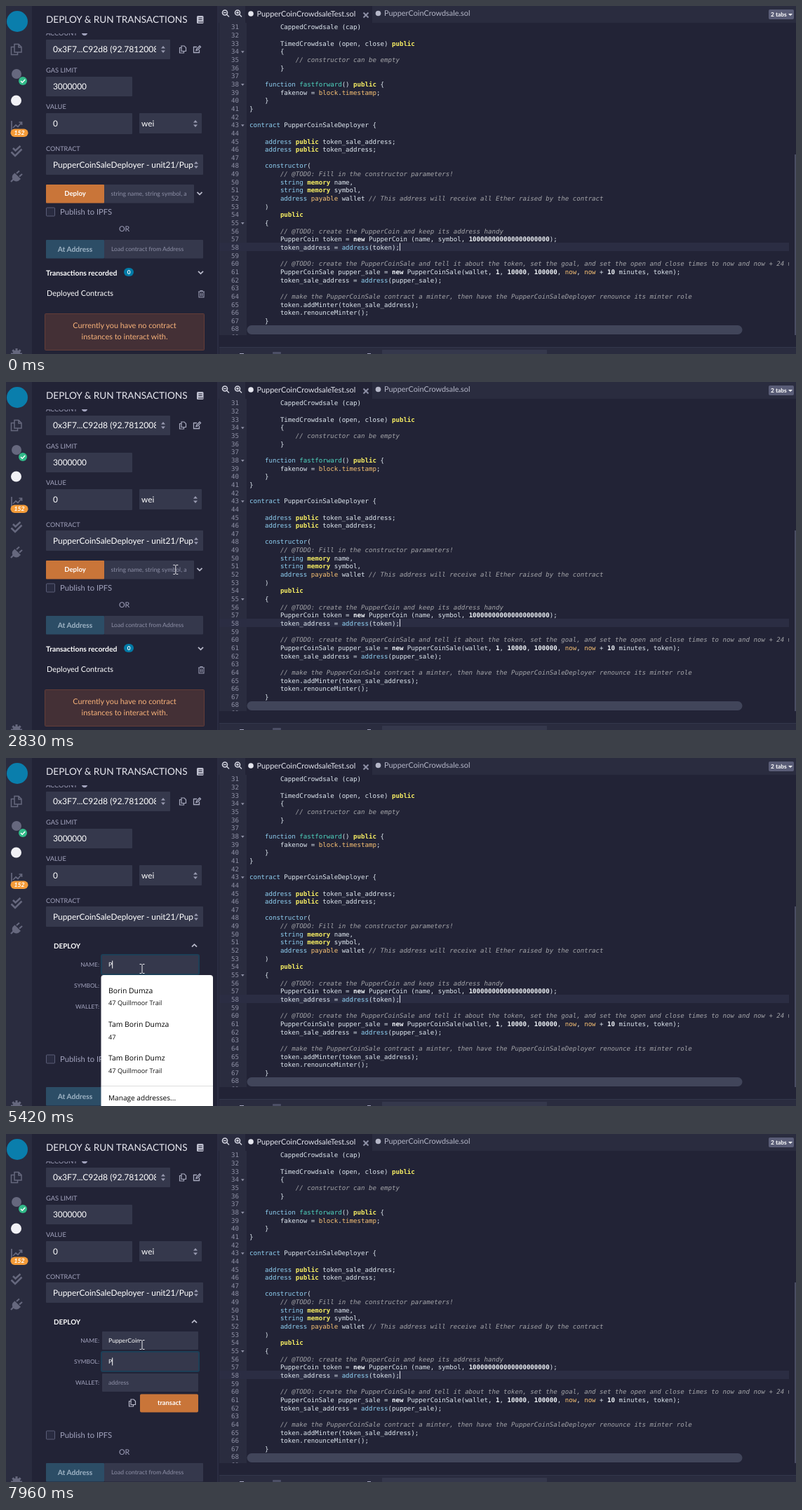
An HTML page for the animation above (8000 ms loop, 1126 by 497 pixels).

```html
<!DOCTYPE html>
<html lang="en">
<head>
<meta charset="utf-8">
<title>Deploy and run</title>
<style>
html, body { margin: 0; width: 100%; height: 100%; overflow: hidden; background: #222336; }
svg { display: block; font-family: Lato, "Open Sans", sans-serif; text-rendering: geometricPrecision; }
.mono { font-family: "DejaVu Sans Mono", monospace; }
.popup { font-family: "Open Sans", "Noto Sans", sans-serif; }
</style>
</head>
<body>
<svg id="stage" width="1126" height="497" viewBox="0 0 1126 497"></svg>
<script>
const LIGHT = '#2a2c3f', FIELD = '#35384c', BODY = '#222336', MUTED = '#a2a3bd', ORANGE = '#c97539', ICON = '#66687e';

const rect = (x, y, w, h, fill, r = 0, more = '') =>
  `<rect x="${x}" y="${y}" width="${w}" height="${h}" fill="${fill}" rx="${r}" ${more}/>`;
const text = (x, y, s, size = 11.8, fill = '#fff', more = '') =>
  `<text x="${x}" y="${y}" font-size="${size}" fill="${fill}" ${more}>${s}</text>`;
const line = (d, stroke, width = 1.3) =>
  `<path d="${d}" fill="none" stroke="${stroke}" stroke-width="${width}"/>`;
const shape = (d, fill) => `<path d="${d}" fill="${fill}"/>`;
const dot = (x, y, r, fill) => `<circle cx="${x}" cy="${y}" r="${r}" fill="${fill}"/>`;
const group = (id, content, more = '') => `<g id="${id}" ${more}>${content}</g>`;
const bold = 'font-weight="700"', mid = 'text-anchor="middle"', end = 'text-anchor="end"';

const chevron = (x, y, dir = 1) => line(`M${x - 3.5} ${y - 1.7 * dir}l3.5 ${3.5 * dir}l3.5 ${-3.5 * dir}`, '#b9bacb', 1.8);
const updown = (x, y) => shape(`M${x - 3} ${y - 1.5}l3 -3.5l3 3.5zM${x - 3} ${y + 1.5}l3 3.5l3 -3.5z`, '#9a9cb2');
const copyIcon = (x, y, c) => line(`M${x - 2} ${y - 5}h4l2.5 2.5v5h-6.5zM${x - 2} ${y - 2.5}h-2.5v7.5h6v-2.5`, c, 1.2);

const code = `        CappedCrowdsale (cap)

        TimedCrowdsale (open, close) public
        {
            // constructor can be empty
        }

    function fastforward() public {
        fakenow = block.timestamp;
    }
}

contract PupperCoinSaleDeployer {

    address public token_sale_address;
    address public token_address;

    constructor(
        // @TODO: Fill in the constructor parameters!
        string memory name,
        string memory symbol,
        address payable wallet // This address will receive all Ether raised by the contract
    )
        public
    {
        // @TODO: create the PupperCoin and keep its address handy
        PupperCoin token = new PupperCoin (name, symbol, 100000000000000000000);
        token_address = address(token);

        // @TODO: create the PupperCoinSale and tell it about the token, set the goal, and set the open and close times to now and now + 24 weeks.
        PupperCoinSale pupper_sale = new PupperCoinSale(wallet, 1, 10000, 100000, now, now + 10 minutes, token);
        token_sale_address = address(pupper_sale);

        // make the PupperCoinSale contract a minter, then have the PupperCoinSaleDeployer renounce its minter role
        token.addMinter(token_sale_address);
        token.renounceMinter();
    }

`.split('\n');

const styles = {
  comment: 'fill="#a3a4a8" font-style="italic"',
  access: 'fill="#f8ef63" font-weight="700"',
  type: 'fill="#8fd0f2"',
  special: 'fill="#f9c274"',
  name: 'fill="#4fd6c0"',
  strong: 'fill="#f2f6fa" font-weight="700"',
};
const tokens = /(?<comment>\/\/.*)|\b(?:(?<access>public|memory)|(?<type>contract|function|constructor|address|string)|(?<special>payable|block|timestamp|now)|(?<name>fastforward)|(?<strong>new|\d+))\b/g;
const paint = s => s.replace(tokens, (m, ...rest) => {
  const kinds = rest.at(-1);
  return `<tspan ${styles[Object.keys(kinds).find(k => kinds[k])]}>${m}</tspan>`;
});

function editor() {
  let out = rect(301, 0, 2, 497, '#2b2d42') + rect(303, 0, 823, 24, LIGHT) + rect(341, 0, 181, 24, BODY)
    + rect(304, 24, 39, 446, LIGHT) + rect(304, 338, 812, 12, '#2b2d43');
  for (const x of [312, 330])
    out += `<circle cx="${x}" cy="9.5" r="3.5" fill="none" stroke="#d5d6e2" stroke-width="1.6"/>`
      + line(`M${x + 2.5} 12l3.5 3.5M${x - 1.8} 9.5h3.6${x > 320 ? `M${x} 7.7v3.6` : ''}`, '#d5d6e2', 1.4);
  out += dot(349, 11, 3.8, '#e4e5ee') + text(357.5, 15, 'PupperCoinCrowdsaleTest.sol', 10.9, '#e4e5ee')
    + line('M509.5 9.5l7 7m0-7l-7 7', '#8d8fa5', 2)
    + dot(530.5, 10.5, 3.8, '#b5b7c8') + text(539, 14.3, 'PupperCoinCrowdsale.sol', 10.9, '#b5b7c8')
    + rect(1087, 5, 36, 14, '#595c76', 2) + text(1090, 15.2, '2 tabs', 8.4, '#fff', bold)
    + shape('M1115 11h6l-3 3z', '#fff');
  let rows = '';
  code.forEach((row, i) => {
    const n = 31 + i, y = 33.4 + i * 11.65, pad = row.search(/\S|$/);
    rows += text(332, y, n, 9.115, '#8f91a6', end);
    if (row) rows += text(347 + pad * 5.487, y, paint(row.trim()), 9.115, '#dfe8f0');
    if ([34, 38, 43, 55].includes(n)) rows += shape(`M335 ${y - 4}h4.6l-2.3 3z`, '#8f91a6');
  });
  return out + '<clipPath id="codeArea"><path d="M304 24h812v446h-812z"/></clipPath>'
    + `<g class="mono" clip-path="url(#codeArea)">${rows}</g>`
    + rect(561, 338.5, 1, 11, '#e6e7ef')
    + rect(343.5, 456, 706, 13, '#41455a', 6.5, 'id="scroll"')
    + rect(1124, 212, 2, 258, '#4a4d63')
    + rect(304, 487, 822, 1, '#34374c') + rect(304, 488, 822, 9, LIGHT)
    + rect(536, 491, 235, 6, FIELD, 1) + rect(380, 494, 12, 3, '#4c4f66', 1)
    + rect(333, 496, 6, 1, MUTED) + rect(515, 496, 5, 1, MUTED);
}

function sidebar() {
  const teeth = [...Array(8)].map((_, i) => `<path d="M-1.5 -8h3v4h-3z" transform="rotate(${i * 45})"/>`).join('');
  return rect(0, 0, 37, 497, LIGHT) + dot(16, 22, 15, '#0a7eac')
    + line('M12 54.5h6l4 4v7.5h-10zM12 58.5h-4.5v11h9v-3.5M18 55v4h4', ICON, 1.5)
    + dot(15, 97, 7, ICON) + dot(24, 107, 6, '#32ba89') + line('M21 107l2.2 2.2l4-4.2', '#fff', 1.5)
    + dot(14.5, 135, 7.5, '#f1f1f6')
    + line('M8 164v14h15M10 174l4-4l3 2.5l5-6M18.5 166h4v4', ICON, 1.7)
    + rect(6.5, 175.5, 25, 11.5, '#f49b38', 5.7)
    + text(19, 184.4, '152', 8.6, '#fff', `${bold} font-style="italic" ${mid}`)
    + line('M10 203l3.5 3.5l7-6.5M7.5 208.5l5.5 5.5l9.5-9.5', ICON, 2.5)
    + line('M7 251l4-4M15 239l4-3.5M19 243.5l4-3.5', ICON, 2.2)
    + shape('M12.5 238.5l8.5 8.5q-5 5.5-9.5 2.5l-2-2q-2.5-5 3-9z', ICON)
    + `<g transform="translate(15 497)" fill="${ICON}">${teeth}<circle r="5.5"/></g>`;
}

function panel() {
  const fixed = text(57, 24, 'DEPLOY &amp; RUN TRANSACTIONS', 13.6, '#e8e8f0')
    + rect(272, 14, 9.5, 11, '#c0c1d0', 1.5) + line('M274.5 17h5M274.5 19.5h5M274 23h7', BODY, 1)
    + '<clipPath id="cut"><path d="M50 39h245v8h-245z"/></clipPath><g clip-path="url(#cut)">'
    + text(57, 41.7, 'ACCOUNT', 9.2, MUTED) + dot(112, 38, 4.2, MUTED) + '</g>'
    + '<clipPath id="account"><path d="M57 48h157v28h-157z"/></clipPath>'
    + rect(57, 48, 177, 28, FIELD, 1) + text(67, 66.3, '0x3F7...C92d8 (92.7812008', 12.1, '#fff', 'clip-path="url(#account)"')
    + updown(224, 62) + copyIcon(252, 62, '#a9abc0')
    + line('M272 58.5h-4.5v8h8v-4M271 63.5l.5-2l4.5-4.5l1.5 1.5l-4.5 4.5z', '#a9abc0')
    + text(57, 94.5, 'GAS LIMIT', 9.3, MUTED) + rect(57, 101, 123, 28, FIELD, 1) + text(67, 119.2, '3000000')
    + text(57, 146.5, 'VALUE', 9.3, MUTED) + rect(57, 153, 123, 30, FIELD, 1) + text(67, 172.2, '0')
    + rect(190, 153, 89, 29, FIELD, 1) + text(193, 172.2, 'wei') + updown(270, 168)
    + text(57, 206.5, 'CONTRACT', 9.1, MUTED) + rect(57, 212, 224, 29, FIELD, 1)
    + text(67, 231.2, 'PupperCoinSaleDeployer - unit21/Pup', 11.85) + updown(271, 227);

  const closed = rect(139, 255, 129, 26.5, FIELD, 1) + rect(57, 255, 83, 26.5, ORANGE, 1)
    + text(98.5, 271.3, 'Deploy', 9.6, '#fff', `${bold} ${mid}`)
    + text(149.5, 271, 'string name, string symbol, a', 8.7, '#8d8fa6') + chevron(276, 267.5);

  let open = text(68, 271.8, 'DEPLOY', 9.9, '#fff', bold) + chevron(268.5, 268, -1);
  ['NAME:', 'SYMBOL:', 'WALLET:'].forEach((label, i) => {
    const y = 282 + 30 * i;
    open += text(133, y + 15.7, label, 8.4, MUTED, end) + rect(137, y, 137, 26, FIELD, 1)
      + rect(136, y - 1, 139, 28, FIELD, 2, `id="focus${i}" stroke="#1d3f57" stroke-width="2" opacity="0"`)
      + text(146, y + 15.8, '', 8.65, '#fff', `id="value${i}"`);
  });
  open += rect(0, 289.5, 1, 11, '#fff', 0, 'id="caret"') + copyIcon(180, 384, '#b9bacb')
    + rect(191, 371.5, 83, 26, ORANGE, 2) + text(232.8, 387.4, 'transact', 9.3, '#fff', `${bold} ${mid}`);

  const lower = rect(57.5, 288, 12, 12, '#292b40', 1, 'stroke="#5a5d77"') + text(77, 297.8, 'Publish to IPFS', 11.25, MUTED)
    + text(168.7, 322.2, 'OR', 10.7, MUTED, mid)
    + rect(140, 334, 141, 26.5, FIELD, 1) + rect(57, 334, 83, 26.5, '#2c4d66', 1)
    + text(98.5, 351, 'At Address', 10.2, '#9fb4c5', `${bold} ${mid}`)
    + text(150, 350.3, 'Load contract from Address', 8.55, '#8d8fa6')
    + text(57, 384.6, 'Transactions recorded', 10.35, '#fff', bold) + rect(168, 374, 14, 12, '#007aa6', 6)
    + text(175, 383, '0', 8.2, '#fff', `${bold} ${mid}`) + chevron(277.5, 380.5)
    + text(58, 413.8, 'Deployed Contracts', 10.9)
    + line('M274 408h9M277 408v-1.5h3v1.5M275 408.5v7.5h7v-7.5M277.4 410v4.5M279.6 410v4.5', '#9a9cb2', 1.1)
    + rect(55.5, 439.5, 227, 52, '#443036', 1, 'stroke="#643d38"')
    + text(169, 460.2, 'Currently you have no contract', 10.9, '#f8b27a', mid)
    + text(169, 476, 'instances to interact with.', 10.9, '#f8b27a', mid);

  return fixed + group('closed', closed) + group('open', open) + group('lower', lower);
}

function popup() {
  const people = [['Borin Dumza', '47 Quillmoor Trail'], ['Tam Borin Dumza', '47'], ['Tam Borin Dumz', '47 Quillmoor Trail']];
  return group('popup', rect(135.5, 310, 159.5, 195, '#fff', 4)
    + people.map(([who, where], i) => text(146, 335.7 + 48.3 * i, who, 10.4, '#000')
      + text(146, 353.2 + 48.3 * i, where, 9.2, '#111')).join('')
    + rect(136, 468, 159, 1, '#ddd') + text(146, 489.3, 'Manage addresses...', 10.1, '#000'), 'class="popup"');
}

const pointers = group('arrow', '<path d="M0 0V12.8L3 10L5.2 14.8L7.2 13.9L5 9.3H9.2Z" fill="#fff" stroke="#111" stroke-width=".6"/>')
  + group('beam', line('M-3.5 -6.5H-1L0 -5.5L1 -6.5H3.5M0 -5.5V5.5M-3.5 6.5H-1L0 5.5L1 6.5H3.5', '#e8e8ec', 1))
  + group('hand', '<path d="M0 0q1.5 0 1.5 1.8V6l5 1q2.5 .5 2 3l-1.2 5V17.5H-.5L-4.5 11.5q-.8-2.4 1.2-2.2l1.8 1.2V1.8Q-1.5 0 0 0Z" fill="#fff" stroke="#111" stroke-width=".7"/>');

document.getElementById('stage').innerHTML = editor() + sidebar() + panel() + popup() + pointers;

const $ = id => document.getElementById(id);
const show = (id, on) => $(id).setAttribute('visibility', on ? 'visible' : 'hidden');
const ramp = (t, a, b) => Math.min(1, Math.max(0, (t - a) / (b - a)));

// time, x, y, pointer from that time on
const moves = [
  [200, 600, 478, 'arrow'], [330, 525, 450, 'beam'], [640, 300, 335, 'arrow'], [800, 222, 314, 'arrow'],
  [960, 211, 325, 'arrow'], [1360, 211, 325, 'arrow'], [1770, 202, 285, 'arrow'], [1920, 202, 285, 'arrow'],
  [1990, 198, 274, 'beam'], [2090, 192, 262, 'beam'], [2510, 192, 262, 'beam'], [3000, 268, 271, 'arrow'],
  [3200, 278, 270, 'hand'], [3370, 281, 265, 'hand'], [3700, 281, 265, 'arrow'], [3960, 222, 292, 'beam'],
  [4090, 203, 297, 'beam'], [4400, 203, 297, 'beam'], [4520, 194, 301, 'beam'], [8000, 194, 301, 'beam'],
];
const keys = [5420, 5710, 5910, 6000, 6090, 6180, 6760, 7020, 7220, 7350];

function setValue(i, typed, hint) {
  const el = $('value' + i);
  el.textContent = typed || hint;
  el.setAttribute('fill', typed ? '#fff' : '#8d8fa6');
  return typed ? el.getComputedTextLength() : 0;
}

function movePointer(t) {
  const i = moves.findLastIndex(m => m[0] <= t);
  for (const id of ['arrow', 'beam', 'hand']) show(id, i >= 0 && moves[i][3] === id);
  let over = false;
  if (i >= 0) {
    const [t0, x0, y0, kind] = moves[i], [t1, x1, y1] = moves[i + 1];
    const k = ramp(t, t0, t1), x = x0 + (x1 - x0) * k, y = y0 + (y1 - y0) * k;
    $(kind).setAttribute('transform', `translate(${x} ${y})`);
    over = x > 343 && y > 456 && y < 469;
  }
  $('scroll').setAttribute('fill', over ? '#595c76' : '#41455a');
}

function draw() {
  const t = performance.now() % 8000, expanded = t >= 3690;
  movePointer(t);
  show('closed', !expanded);
  show('open', expanded);
  $('lower').setAttribute('transform', `translate(0 ${expanded ? 136 : 0})`);
  show('popup', t >= 4600 && t < 5490);

  const next = ramp(t, 7530, 7620);
  $('focus0').setAttribute('opacity', ramp(t, 4420, 4600) - next);
  $('focus1').setAttribute('opacity', next);
  const widths = [
    setValue(0, 'PupperCoin'.slice(0, keys.filter(k => k <= t).length), 'string'),
    setValue(1, t >= 7960 ? 'P' : '', 'string'),
  ];
  setValue(2, '', 'address');
  const active = t >= 7550 ? 1 : 0;
  $('caret').setAttribute('x', 146 + widths[active]);
  $('caret').setAttribute('y', 289.5 + 30 * active);
  show('caret', t >= 4480 && (t < 4980 || t >= 5420));
  requestAnimationFrame(draw);
}
draw();
</script>
</body>
</html>
```
